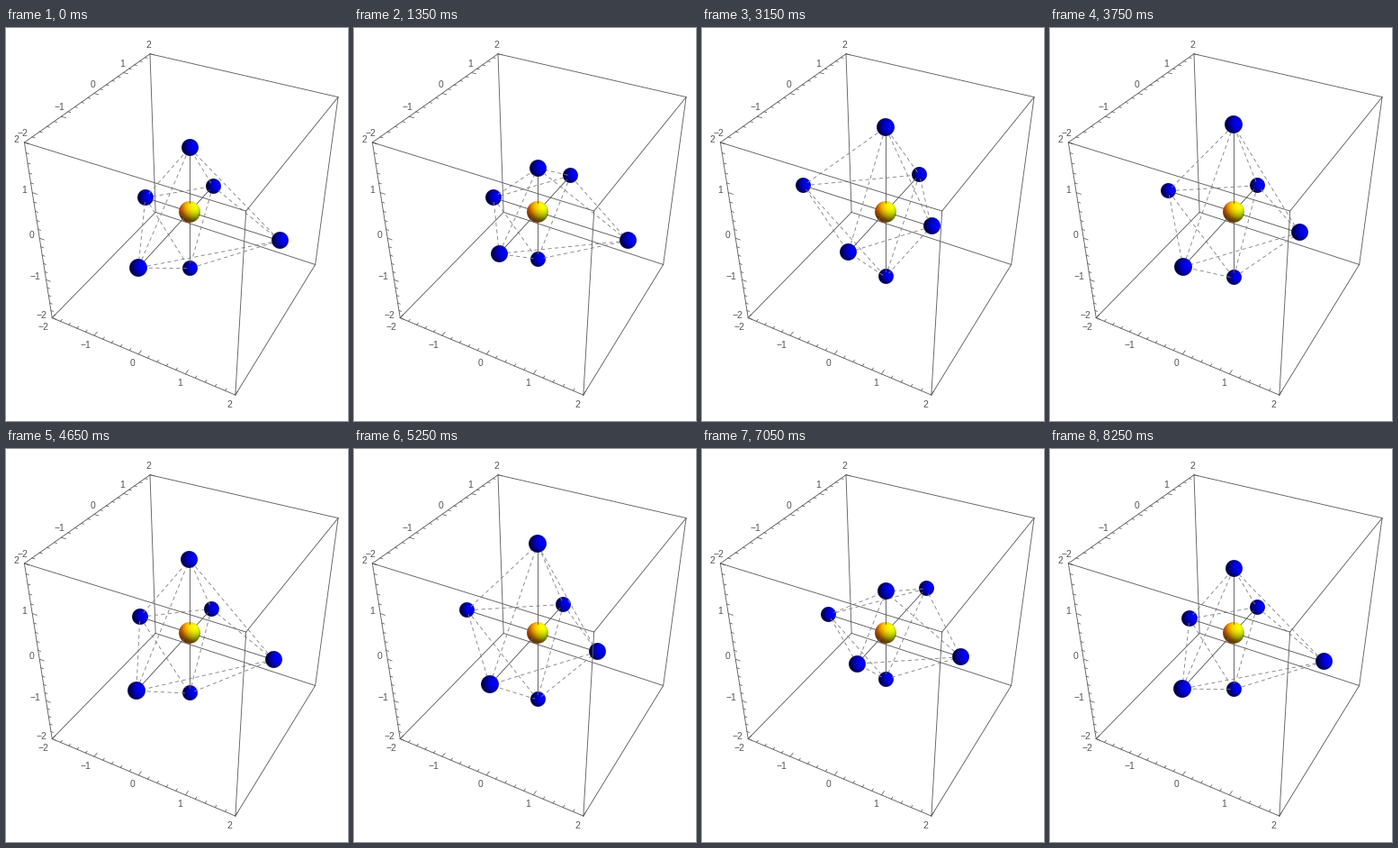
A matplotlib script that plays this animation: 380 px wide and 436 px high, repeating every 9 s.

```python
import itertools
import numpy as np
import matplotlib.pyplot as plt
from matplotlib.animation import FuncAnimation

W, H, DPI = 380, 436, 100
PX = 72 / DPI                      # one pixel in points
STEP_MS, STEPS = 150, 60
BOND, SWING, LOW_SWING = 1.413, 0.5, 0.278
R_CORE, R_ION = 0.2, 0.15
GREY = "#606060"

plt.rcParams["lines.scale_dashes"] = False
plt.rcParams["font.family"] = "Liberation Sans"

# Perspective camera looking at the centre of the box
CAMERA = np.array([5.2, -9.6, 8.0])
DIST = np.linalg.norm(CAMERA)
TOWARD = CAMERA / DIST
RIGHT = np.cross([0, 0, 1], TOWARD)
RIGHT /= np.linalg.norm(RIGHT)
UP = np.cross(TOWARD, RIGHT)
ZOOM, CX, CY = 792, 203.4, 203.4


def depth(p):
    return DIST - np.dot(p, TOWARD)


def project(p):
    k = ZOOM / depth(p)
    return CX + k * np.dot(p, RIGHT), CY - k * np.dot(p, UP)


fig = plt.figure(figsize=(W / DPI, H / DPI), dpi=DPI, facecolor="white")
ax = fig.add_axes([0, 0, 1, 1])
ax.axis("off")


def segment(a, b, z, color=GREY, width=0.9):
    (x0, y0), (x1, y1) = project(a), project(b)
    return ax.plot([x0, x1], [y0, y1], color=color, lw=width * PX, zorder=z)[0]


def draw_box():
    corners = [np.array(c) for c in itertools.product((-2, 2), repeat=3)]
    near = np.array([2, -2, 2])
    for a, b in itertools.combinations(corners, 2):
        if np.abs(a - b).sum() == 4:
            in_front = (a == near).all() or (b == near).all()
            segment(a, b, 0 if in_front else -100)


def draw_axis(axis, base, inward, dx, dy, ha="right"):
    inward = np.array(inward)
    for i in range(-10, 11):
        p = np.array(base, float)
        p[axis] = i / 5
        major = i % 5 == 0
        segment(p, p + inward * (0.1 if major else 0.055), -100, width=0.8)
        if major:
            x, y = project(p)
            ax.text(x + dx, y + dy, str(i // 5).replace("-", "\u2212"),
                    ha=ha, va="center_baseline", color="#555555",
                    fontsize=10.4 * PX, zorder=-100)


def ball_image(color, n=96):
    """Shade a ball with an ambient light and four coloured lamps."""
    y, x = np.mgrid[1:-1:n * 1j, -1:1:n * 1j]
    rho = np.hypot(x, y)
    inside = np.maximum(rho, 1)
    x, y = x / inside, y / inside
    normal = np.stack([x, y, np.sqrt(np.clip(1 - x * x - y * y, 0, 1))], -1)
    light = np.zeros((n, n, 3)) + (0.4, 0.2, 0.2)
    lamps = [((1, 0, 1), (0, 0.18, 0.5)), ((1, 1, 1), (0.18, 0.5, 0.18)),
             ((0, 1, 1), (0.5, 0.18, 0)), ((0, 0, 1), (0, 0, 0.18))]
    for way, tint in lamps:
        way = np.array(way) / np.linalg.norm(way)
        light += np.clip(normal @ way, 0, 1)[..., None] * np.array(tint)
    rgb = np.clip(light * np.array(color), 0, 1)
    alpha = np.clip((1 - rho) * n / 2 + 0.5, 0, 1)
    return np.dstack([rgb, alpha])


def make_ball(color):
    return ax.imshow(ball_image(color), aspect="auto", extent=(0, 1, 1, 0))


def place_ball(ball, p, radius):
    x, y = project(p)
    r = radius * ZOOM / depth(p)
    ball.set_extent((x - r, x + r, y + r, y - r))
    ball.set_zorder(-depth(p))


def place_line(line, a, b, trim_a, trim_b):
    """Join two balls from surface to surface, sorted by depth."""
    way = (b - a) / np.linalg.norm(b - a)
    (x0, y0), (x1, y1) = project(a + way * trim_a), project(b - way * trim_b)
    line.set_data([x0, x1], [y0, y1])
    line.set_zorder(-depth((a + b) / 2))


def ions(theta):
    x, y, z = np.cos(theta - np.radians([0, 120, 240]))
    return np.array([
        (BOND + SWING * x, 0, 0), (-BOND + SWING * x, 0, 0),
        (0, BOND + SWING * y, 0), (0, -BOND + SWING * y, 0),
        (0, 0, BOND + SWING * z), (0, 0, -BOND - LOW_SWING * z)])


def phase(n):
    """Sweep one full turn forward and back, resting at the start."""
    j = min(max(n - 4, 0), 51)
    return np.radians(max(0, 360 - 14.65 * abs(j - 25.5)) - 30)


draw_box()
draw_axis(0, (0, -2, -2), (0, 1, 0), -3.6, 9.4)
draw_axis(1, (-2, 0, 2), (1, 0, 0), -1.6, -11, ha="center")
draw_axis(2, (-2, -2, 0), (1, 0, 0), -5.8, -4)

core = make_ball((1, 1, 0))
balls = [make_ball((0, 0, 1)) for _ in range(6)]
spokes = [ax.plot([], [], color="#585858", lw=0.9 * PX)[0] for _ in range(6)]
pairs = [(a, b) for a, b in itertools.combinations(range(6), 2)
         if a // 2 != b // 2]
edges = [ax.plot([], [], color="#868686", lw=0.9 * PX, dash_capstyle="butt",
                 linestyle=(0, (4.2 * PX, 3.4 * PX)))[0] for _ in pairs]
ORIGIN = np.zeros(3)
place_ball(core, ORIGIN, R_CORE)
ax.set_xlim(-0.5, W - 0.5)
ax.set_ylim(H - 0.5, -0.5)


def update(n):
    pts = ions(phase(n))
    for ball, spoke, p in zip(balls, spokes, pts):
        place_ball(ball, p, R_ION)
        place_line(spoke, ORIGIN, p, R_CORE, R_ION)
    for edge, (a, b) in zip(edges, pairs):
        place_line(edge, pts[a], pts[b], R_ION, R_ION)
    ax.set_xlim(-0.5, W - 0.5)
    ax.set_ylim(H - 0.5, -0.5)
    return []


anim = FuncAnimation(fig, update, frames=STEPS, interval=STEP_MS,
                     repeat=True, repeat_delay=0)
plt.show()
```
